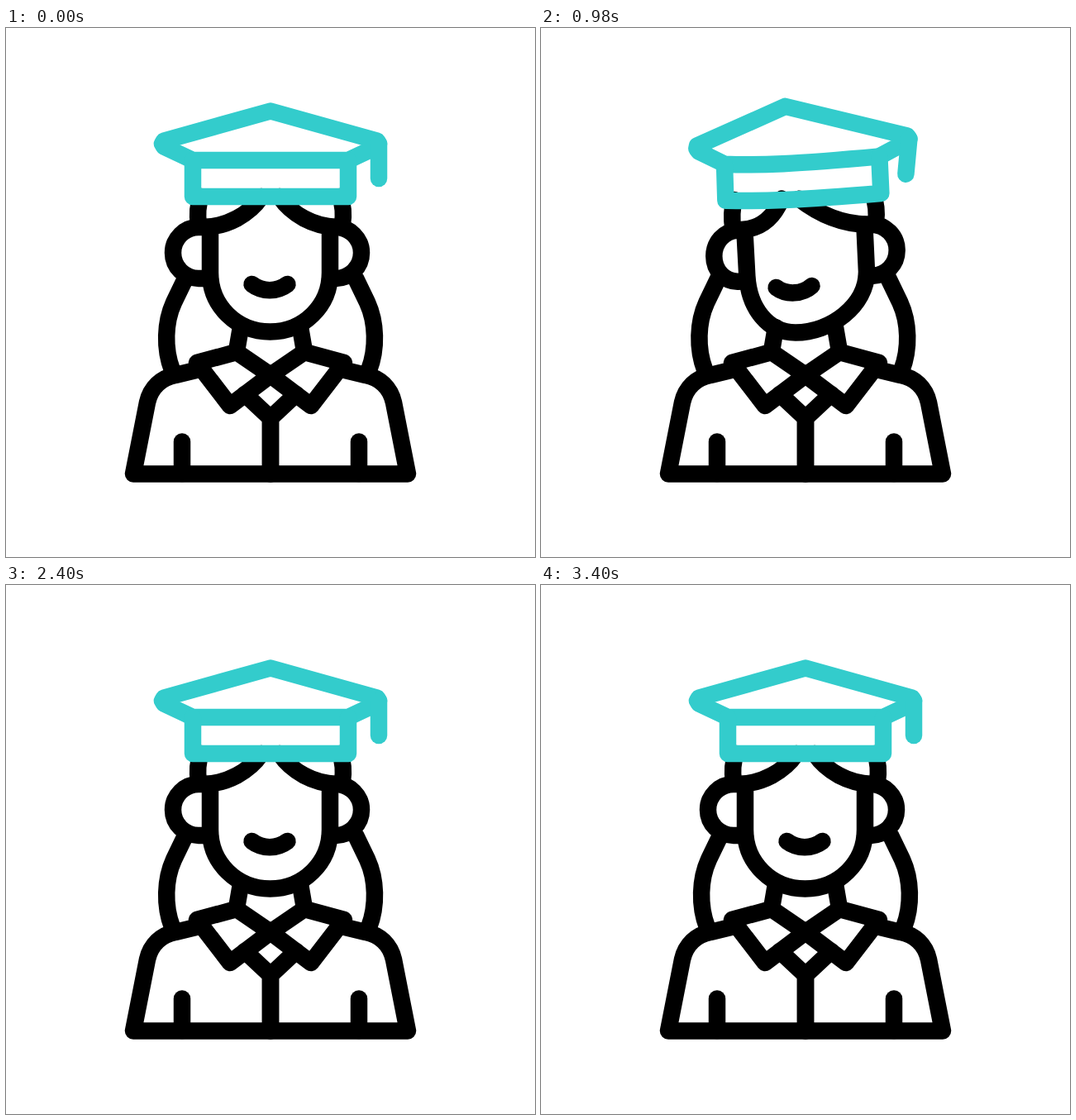
An HTML page for the animation above (3.6 s loop, 640x640 px).

```html
<!DOCTYPE html>
<html lang="en">
<head>
<meta charset="utf-8">
<title>Graduate</title>
<style>
  html, body { margin: 0; width: 100%; height: 100%; overflow: hidden; background: #fff; }
  svg { display: block; width: 100%; height: 100%; }
  g { fill: none; stroke: #000; stroke-width: 20.5; stroke-linecap: round; stroke-linejoin: round; }
  #cap { stroke: #33cccc; }
</style>
</head>
<body>
<svg viewBox="0 0 640 640">
  <g id="hair"></g>
  <g id="body"></g>
  <g id="head"></g>
  <g id="cap"></g>
</svg>
<script>
const LOOP = 3600;
const NOD_HEIGHT = 22.5;
const SWING = 1100;

// [time, value] steps, eased in and out between neighbours
const TURN = [[0, 0], [540, -1], [680, -1.02], [1800, 1], [1980, 1.02], [2400, 0]];
const NOD = [[2600, 0], [2970, 0.96], [3120, 1], [3400, 0]];

// Each shape: rest, turned left, turned right
const HEAD = [
  // side hair
  ['M236 204C232 214 231 224 233 238', 'M233 210C230 222 230 232 232 245', 'M239 196C235 207 233 220 234 234'],
  ['M404 204C408 214 409 224 407 238', 'M400 200C404 210 406 220 404 234', 'M407 210C410 222 411 232 408 245'],
  // fringe
  ['M240 241C268 240 294 226 309 204', 'M240 246C262 246 274 234 282 208', 'M240 237C275 236 305 228 336 208'],
  ['M400 241C372 240 346 226 331 204', 'M392 236C368 236 338 230 303 208', 'M400 246C380 246 367 234 358 208'],
  // face
  ['M247 241L247 296C247 336 279 367.5 319.5 367.5C360 367.5 392 336 392 296L392 241',
   'M246 246L250.5 302C254 340 272 369 302 369C345 369 395 336 395 294L391 236',
   'M247 237L244 293C244 334 294 369 337 369C367 369 384 340 388 305L393 246'],
  // ears
  ['M247 241L233 241C216 241 202 255 202 272C202 289 216 303 233 303L247 303',
   'M246 246L240 246.5C224 248 213 262 213 278C213 296 226 309 241 308.5L250 308',
   'M247 237L233 236C214 234 198 249 198 266C198 283 212 297 229 297L244 298'],
  ['M392 241L399 241C416 241 430 255 430 272C430 289 416 303 399 303L392 303',
   'M391 236L400 236C417 236 431 250 431 267C431 285 418 297 403 298L395 299',
   'M393 246L400 246.5C417 249 429 262 429 278C429 296 415 309 399 309L388 308'],
  // mouth
  ['M297.5 310C310 319.5 328 319.5 340.5 310', 'M278 316C290 325 310 324 321 313', 'M315 313C326 324 346 325 358 316']
];

const CAP = [
  // board
  ['M320 100.5L191 136.5L189 140L191 143.5L226 160C289 160 351 160 414 160L449 143.5L451 140L449 136.5Z',
   'M283 92L188 145.5L188 149L191 152.5L220 167C250 170 285 167 407 153L440 134L442.5 131L440 127.5Z',
   'M360 93L199 127.5L197 131L199 134.5L232 154C355 167 390 169 422 167L452 152L455 148L453 146Z'],
  // band
  ['M226 160L226 204C289 204 351 204 414 204L414 160',
   'M220 167L222 211C252 213 288 211 410 198L407 153',
   'M232 154L229 198C351 210.5 386 212.5 418 211L422 167'],
  // tassel
  ['M451 140L451 182', 'M442.5 131L436.5 174', 'M455 148L465 192']
];

// Left halves, mirrored for the right: rest, lifted
const PONYTAIL = ['M217 303L203 332C192 356 191 388 201 414', 'M217 280.5L203 310C191 334 191 370 205 403'];
const HALF_BODY = [
  ['M320 539.5L154 539.5L171 453C175 435 188 423 205 420L238 412',
   'M320 539.5L154 539.5L171 446C175 427 188 413 205 409L238 400'],
  ['M231 405L279 392L320 420L271 457Z', 'M231 393L279 380L320 408L271 446Z'],
  ['M284 362L279 391', 'M284 339.5L279 379'],
  ['M289 443L320 472L320 539', 'M289 431L320 461L320 539'],
  ['M213 500.5L213 539', 'M213 500.5L213 539']
];

const byId = id => document.getElementById(id);
const numbers = d => d.match(/[\d.]+/g).map(Number);

function addShape(group, poses, mirror) {
  const el = document.createElementNS('http://www.w3.org/2000/svg', 'path');
  if (mirror) el.setAttribute('transform', 'matrix(-1 0 0 1 640 0)');
  group.appendChild(el);
  return { el, commands: poses[0].match(/[A-Z]/g).length && poses[0].split(/[\d.]+/), poses: poses.map(numbers) };
}

function pose(shape, target, amount) {
  const [rest] = shape.poses;
  const to = shape.poses[target];
  shape.el.setAttribute('d', shape.commands.map((c, i) =>
    i < rest.length ? c + (rest[i] + (to[i] - rest[i]) * amount).toFixed(2) : c).join(''));
}

function sample(steps, t) {
  const i = steps.findIndex(s => s[0] > t);
  if (i < 0) return steps[steps.length - 1][1];
  if (i === 0) return steps[0][1];
  const [t0, a] = steps[i - 1], [t1, b] = steps[i];
  const x = (t - t0) / (t1 - t0);
  return a + (b - a) * x * x * (3 - 2 * x);
}

const hair = byId('hair'), body = byId('body'), head = byId('head'), cap = byId('cap');
const turning = [...HEAD.map(p => addShape(head, p)), ...CAP.map(p => addShape(cap, p))];
const lifting = [PONYTAIL, ...HALF_BODY].flatMap((p, i) =>
  [false, true].map(m => addShape(i ? body : hair, p, m)));

function draw(t) {
  const turn = sample(TURN, t);
  const nod = sample(NOD, t);
  const speed = (sample(TURN, t + 10) - sample(TURN, t - 10)) / 20;
  turning.forEach(s => pose(s, turn < 0 ? 1 : 2, Math.abs(turn)));
  lifting.forEach(s => pose(s, 1, nod));
  const lift = `translate(0 ${-NOD_HEIGHT * nod})`;
  head.setAttribute('transform', lift);
  cap.setAttribute('transform', lift);
  hair.setAttribute('transform', `translate(${0.5 * turn - SWING * speed} 0)`);
}

const start = performance.now();
function tick() {
  const t = (performance.now() - start) % LOOP;
  draw(Math.floor(t / 20) * 20);
  requestAnimationFrame(tick);
}
tick();
</script>
</body>
</html>
```
